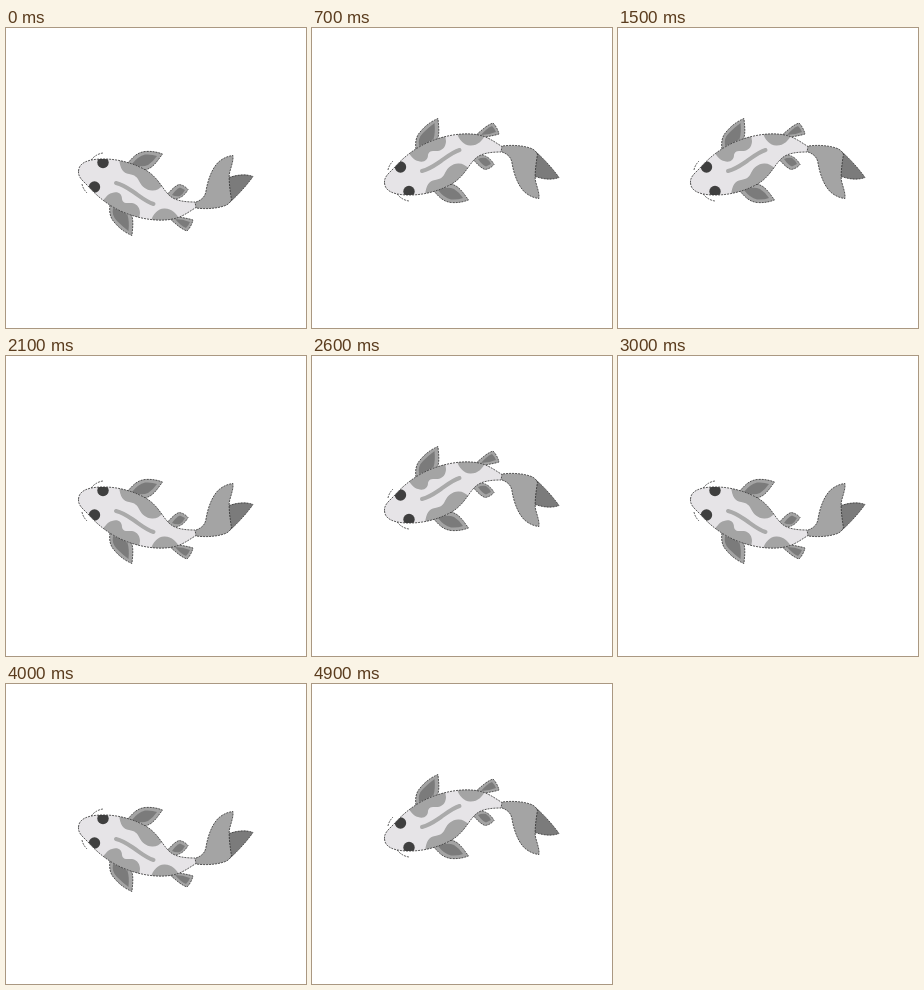
These frames come from a looping animation (300x300 px, 5000 ms). An HTML page:

```html
<!DOCTYPE html>
<html lang="en">
<head>
<meta charset="utf-8">
<title>Swimming koi</title>
<style>
  html, body { margin: 0; width: 100%; height: 100%; overflow: hidden; background: #fff; }
  svg { display: block; width: 100vw; height: 100vh; }
  .line { stroke: #333; stroke-width: .8; stroke-dasharray: 2 1; }
  .light { fill: #a4a4a4; }
  .dark { fill: #7b7b7b; }
  .skin { fill: #e6e4e7; }
  .eye { fill: #3f3f3f; }
</style>
</head>
<body>
<svg viewBox="0 0 300 300">
  <defs>
    <path id="body" d="M72.500 143C73 135 81 131.500 95 131C113 130.500 130 136 142 143.500C153 151 157 162 164 168C170 173 179 174 189 174L190 179.500C181 185 175 190 164 191.500C147 194 124 189 107 179C97 173 89 166 82 158C76 152 72 149 72.500 143Z"/>
    <clipPath id="inside"><use href="#body"/></clipPath>
  </defs>
  <g id="fish">
    <!-- fins -->
    <g class="light line">
      <path d="M121 136C127 129 131 124.500 139 123.500C146 123 151 124 156.500 126C152 132 149 137 144 140C139 143 130 143 124 141Z"/>
      <path d="M104 177C103 184 104 190 109 195C114 201 120 205 126 207.500C126.500 200 128 193 125 185C119 182 111 178 104 177Z"/>
      <path d="M160 168C165 162 169 158 173 156.500Q178 157 182 161.500Q179 167 175 169Q170 172 164 172Z"/>
      <path d="M164 191C170 196 175 201 181 203C184 200 186 196 187 192C181 190 176 190 171 188Z"/>
    </g>
    <g class="dark">
      <path d="M126 136Q132 128 139 126.500Q146 126 151 128Q147 134 142 137Q135 140 126 136Z"/>
      <path d="M107 180Q105.500 188 111 193Q117 199 122.500 203Q123.500 193 121.500 187Q115 182 107 180Z"/>
      <path d="M166 167Q170 161 174 159.500L179 162Q177 166 174 168Q170 169 166 167Z"/>
      <path d="M169 191Q175 198 180 200Q183 197 184 194Q177 191 169 191Z"/>
    </g>
    <!-- tail -->
    <path class="dark line" d="M224 174C232 167 241 157 247 148.500C239 145.500 230 147 222 150Z"/>
    <path class="light line" d="M187 175C194 173 199 170 200 163C202 151 206 141 212 134.500C217 130 222 128 227 127.500C227.500 133 225 139 223.500 145C222.500 152 224 162 225.500 172C223 176 221 177 218 178C209 181 198 181 190 180Z"/>
    <!-- body and markings -->
    <use href="#body" class="skin"/>
    <g clip-path="url(#inside)">
      <g class="light">
        <path d="M113 130C114 141 117 145 123 146C129 147 131 149 133 153C136 159 140 162 146 162.500Q152 163 157 157L162 148L130 124Z"/>
        <path d="M94 176C98 172 101 166 106 165C112 163 116 166 116 171C117 176 121 175 126 175C132 176 134 181 134 185L132 198L102 190Z"/>
        <path d="M144 196C146 187 151 181 158 180.500C165 180 171 185 174 193L166 202Z"/>
      </g>
      <g class="eye">
        <circle cx="97" cy="134.500" r="5.700"/>
        <circle cx="88.500" cy="159" r="5.700"/>
      </g>
    </g>
    <path d="M110 155C118 157 123 161 129 165C136 170 141 174 147.500 176" fill="none" stroke="#aaa" stroke-width="4" stroke-linecap="round"/>
    <g class="line" fill="none">
      <use href="#body"/>
      <path d="M85 132Q90 126 97 125M76 156Q77 161 81 165"/>
    </g>
  </g>
</svg>
<script>
  const fish = document.getElementById('fish');
  const BEAT = 500;

  // The fish snaps to its mirror image on every beat.
  function draw() {
    const mirrored = Math.floor(performance.now() % 5000 / BEAT) % 2;
    fish.setAttribute('transform', mirrored ? 'matrix(1 0 0 -1 0 298)' : '');
    requestAnimationFrame(draw);
  }
  draw();
</script>
</body>
</html>
```
